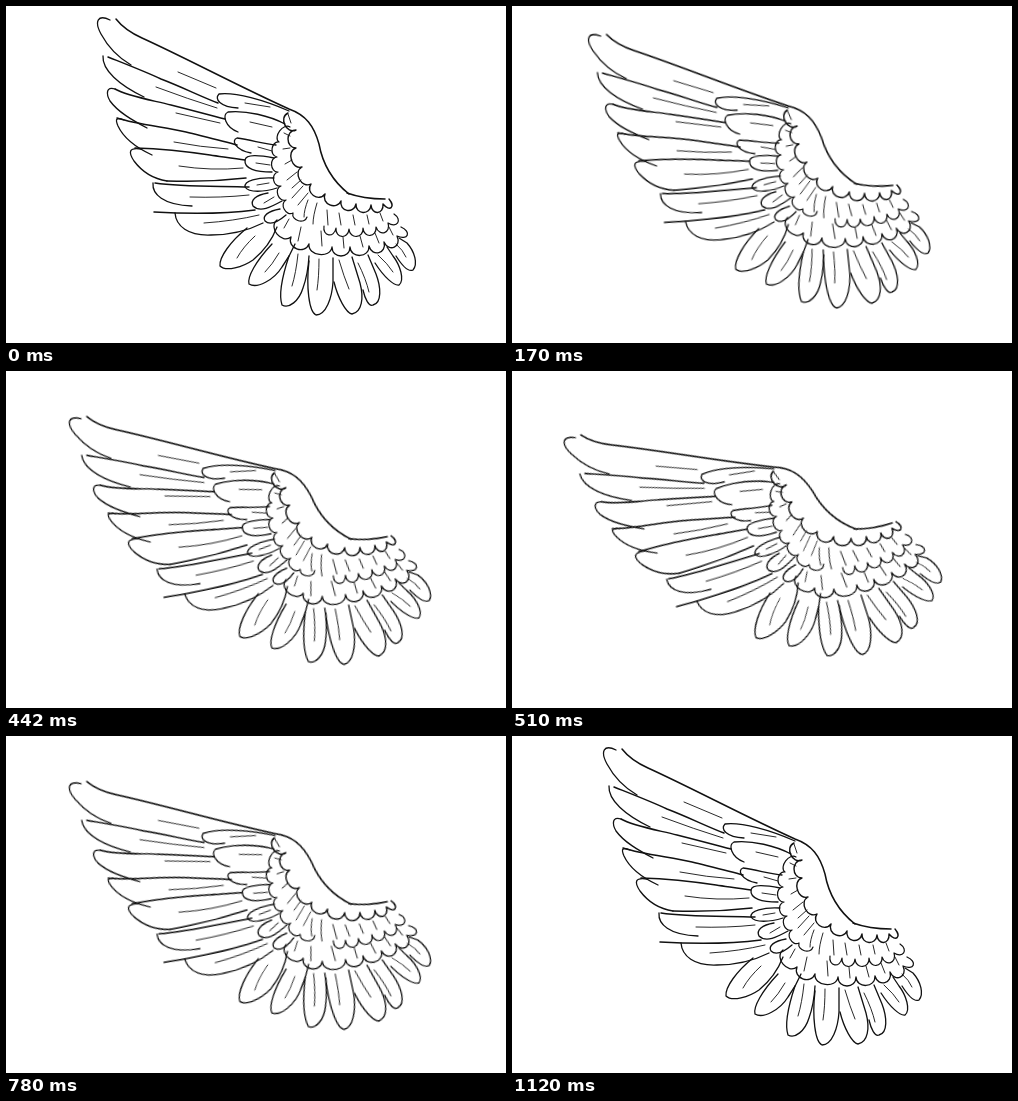
These frames come from a looping animation (500 by 337 pixels, 1.29 s). An HTML page:

```html
<!DOCTYPE html>
<html lang="en">
<head>
<meta charset="utf-8">
<title>Wing</title>
<style>
  html, body { margin: 0; width: 100%; height: 100%; overflow: hidden; background: #fff; }
  svg { display: block; width: 100%; height: 100%; }
  #wing { transform-origin: 250px 168.5px; fill: none; stroke: #111; stroke-linecap: round; stroke-linejoin: round; }
</style>
</head>
<body>
<svg viewBox="0 0 500 337"><g id="wing"></g></svg>
<script>
const wing = document.getElementById('wing');

function ink(d, width) {
  const path = document.createElementNS('http://www.w3.org/2000/svg', 'path');
  path.setAttribute('d', d);
  path.setAttribute('stroke-width', width);
  wing.append(path);
}

// A row of rounded feather ends hanging between neighbouring points
function scallops(points, depth) {
  let d = '';
  for (let i = 1; i < points.length; i++) {
    const [x, y] = points[i - 1], [u, v] = points[i];
    const len = Math.hypot(u - x, v - y), k = depth * 1.33 / len;
    const nx = (y - v) * k, ny = (u - x) * k;
    d += `M${x} ${y}C${x + nx} ${y + ny} ${u + nx} ${v + ny} ${u} ${v}`;
  }
  return d;
}

const arm = [
  'M110 13C117 22 125 27 136 32C180 52 232 80 283 103C300 109 308 120 313 138C317 160 329 177 343 188',
  'M341 187C352 191 365 193 379 193',
];

const tips = [
  'M104 14C92 8 88 15 95 28C102 41 113 52 125 59',
  'M97 50C96 64 113 79 138 91',
  'M109 83C100 80 100 88 104 95C112 106 126 114 141 122',
  'M118 114C110 111 109 113 112 120C118 133 131 142 146 149',
  'M135 143C123 141 122 146 128 155C137 167 148 173 161 175',
  'M147 177C146 188 157 199 186 200',
  'M169 207C170 220 182 230 205 229C224 229 241 225 257 217',
];

const edges = [
  'M102 51C122 59 140 66 155 73C176 81 196 91 212 97',
  'M109 83C121 90 145 94 165 99C185 104 203 109 219 113',
  'M111 112C133 119 160 121 180 126C200 131 217 135 231 139',
  'M129 142C160 143 184 146 204 149C218 151 229 153 239 154',
  'M161 175C188 176 214 175 240 172',
  'M149 177C175 181 211 180 243 181',
  'M148 206C182 208 218 208 249 204',
];

const vanes = [
  'M172 66L210 82', 'M150 81Q182 93 211 102', 'M170 107L214 117',
  'M168 136Q194 141 222 143', 'M173 160Q205 165 237 162',
  'M184 191Q215 192 243 189', 'M198 217Q228 215 253 209',
];

const coverts = [
  'M232 102C214 101 208 93 213 88C230 86 258 94 283 105',
  'M232 126C219 121 216 109 222 106C240 104 264 110 279 118',
  'M245 147C229 144 225 134 231 132C245 134 259 138 270 139',
  'M268 152C253 149 240 148 239 154C238 163 250 166 266 166',
  'M268 172C251 171 238 175 239 181C243 187 258 186 271 182',
  'M262 187C250 189 244 194 247 200C254 207 265 201 276 195',
  'M274 203C262 205 256 210 259 215C264 220 273 215 280 209',
];

const tail = [
  'M241 222C225 235 213 251 214 260C220 266 237 261 247 254C258 245 266 234 271 221',
  'M266 238C250 255 241 271 243 278C251 283 268 274 276 261Q284 250 289 238',
  'M283 250C276 271 273 290 276 299C283 303 293 295 297 282Q302 268 303 250',
  'M303 255C300 281 303 306 310 309C320 309 326 292 327 276L327 252',
  'M328 276C332 292 340 307 346 308C356 306 358 292 354 277L346 251',
  'M357 284C359 293 363 301 367 299C376 297 375 281 370 268L362 249',
  'M369 257C378 271 388 280 393 279C399 274 394 259 387 250L381 241',
  'M390 250C397 261 403 266 407 264C412 258 409 246 401 237L393 232',
];

const shafts = [
  'M249 230Q237 241 231 252', 'M273 247Q266 259 259 266', 'M292 248Q290 267 286 280',
  'M313 253Q313 271 311 284', 'M333 254Q338 271 343 283', 'M352 257Q360 273 363 286',
  'M372 249Q382 258 387 266', 'M390 238Q397 244 400 251',
];

const barbs = [
  'M239 97L264 101M244 116L266 121M252 141L266 145',
  'M250 157L264 159M251 179L263 177M258 197L268 191',
  'M282 108L285 117M278 127L284 130M277 143L284 142M279 158L286 154',
  'M281 174L291 166M286 182L295 174M286 192L297 180M292 199L302 187',
  'M302 194Q298 204 298 211M311 197Q307 210 307 218M321 204L322 219',
  'M333 207L335 219M347 209L349 219M361 209L363 218M374 207L377 215',
  'M283 213L278 222M295 221L292 235M315 225L316 240M337 231L338 242',
  'M354 230L357 241M369 227L373 237M383 221L387 229',
];

const inner = [[282, 107], [290, 124], [290, 142], [296, 161], [305, 178], [319, 188],
  [335, 195], [350, 198], [365, 199], [377, 198], [383, 193]];
const middle = [[284, 121], [273, 136], [271, 151], [272, 166], [275, 180], [280, 194],
  [287, 207], [301, 211]];
const lower = [[318, 220], [330, 222], [343, 223], [357, 222], [370, 221], [382, 217], [388, 208]];
const outer = [[271, 214], [285, 231], [303, 238], [326, 241], [344, 241], [363, 240],
  [378, 236], [391, 230], [395, 221]];

[...arm, ...edges].forEach(d => ink(d, 1.5));
[...tips, ...coverts, ...tail].forEach(d => ink(d, 1.3));
[...vanes, ...shafts, ...barbs].forEach(d => ink(d, 0.9));
ink(scallops(inner, 8), 1.4);
ink(scallops(middle, 6), 1.2);
ink(scallops(lower, 8), 1.2);
ink(scallops(outer, 9), 1.3);

const loop = 1290;
const poses = [[0, 0], [170, -6], [340, -12], [510, -18], [780, -12], [950, -6], [1120, 0], [loop, 0]];
wing.animate(
  poses.map(([time, angle]) => ({
    offset: time / loop, transform: `rotate(${angle}deg)`, easing: 'steps(1, end)',
  })),
  { duration: loop, iterations: Infinity }
);
</script>
</body>
</html>
```
